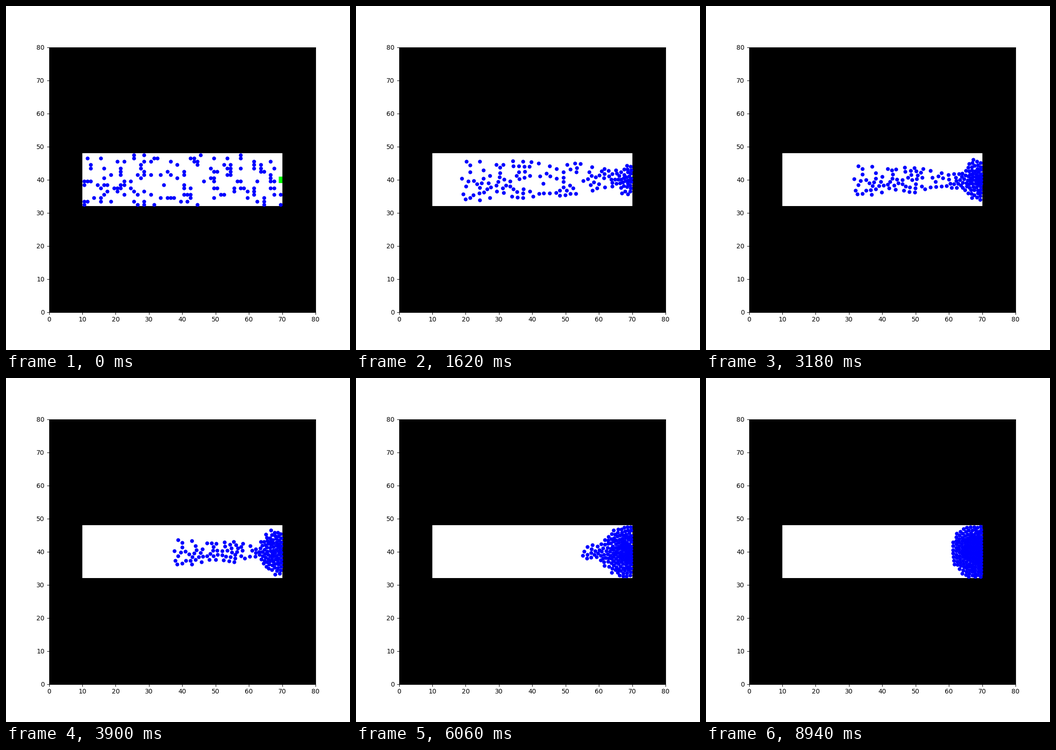
These frames come from a looping animation (748 by 748 pixels, 9000 ms). A matplotlib script:

```python
import numpy as np
import matplotlib.pyplot as plt
from matplotlib.animation import FuncAnimation
from matplotlib.patches import Rectangle

FRAMES, INTERVAL = 150, 60
SUBSTEPS = 5

LEFT, RIGHT, BOTTOM, TOP = 10, 70, 32, 48
EXIT = np.array([70.0, 40.0])

SPEED = 0.5      # desired speed, cells per frame
RELAX = 10.0     # frames needed to reach it
PUSH = 0.072     # repulsion at contact
RANGE = 0.08     # how fast repulsion fades
RADIUS = 0.5

# Occupied columns of each room row, from the bottom row up
ROWS = [
    [10, 26, 28, 31, 44, 64, 69],
    [10, 11, 15, 18, 25, 28, 39, 41, 62, 64],
    [13, 15, 33, 35, 36, 37, 42, 49, 59, 64],
    [16, 22, 26, 30, 40, 41, 42, 51, 52, 61, 67, 69],
    [17, 20, 25, 28, 55, 59, 61],
    [15, 19, 20, 21, 24, 40, 42, 49, 50, 55, 57, 58, 61, 66, 67],
    [10, 14, 16, 17, 21, 22, 34, 40],
    [10, 11, 12, 22, 24, 46, 49, 56, 57, 62, 66, 67],
    [16, 27, 38, 48, 49, 66],
    [18, 21, 26, 28, 30, 33, 36, 40, 53, 54, 66],
    [21, 28, 35, 40, 49, 50, 54, 63, 64],
    [12, 16, 21, 27, 48, 53, 54, 57, 61, 63, 67],
    [12, 27, 38, 44, 52, 54, 61, 63],
    [20, 22, 28, 30, 36, 43, 44, 61, 66],
    [11, 15, 25, 31, 32, 42, 43, 49, 53, 57],
    [25, 28, 45, 57],
]


def repulsion(gap):
    return PUSH * np.exp(np.minimum(-gap / RANGE, 4.5))


def acceleration(pos, vel):
    to_exit = EXIT - pos
    dist = np.linalg.norm(to_exit, axis=1, keepdims=True)
    acc = (SPEED * to_exit / np.maximum(dist, 0.05) - vel) / RELAX

    delta = pos[:, None] - pos[None]
    sep = np.sqrt((delta ** 2).sum(axis=2))
    np.fill_diagonal(sep, 1e3)
    sep = np.maximum(sep, 1e-6)
    force = repulsion(sep - 2 * RADIUS) / sep
    acc += (force[:, :, None] * delta).sum(axis=1)

    for axis, low, high in ((0, LEFT, RIGHT), (1, BOTTOM, TOP)):
        p = pos[:, axis]
        acc[:, axis] += repulsion(p - low - RADIUS) - repulsion(high - p - RADIUS)
    return acc


def simulate():
    pos = np.array([(col + 0.5, BOTTOM + row + 0.5)
                    for row, cols in enumerate(ROWS) for col in cols])
    vel = np.zeros_like(pos)
    dt = 1 / SUBSTEPS
    path = [pos.copy()]
    for frame in range(1, FRAMES):
        for _ in range(SUBSTEPS - (frame == 1)):
            vel += acceleration(pos, vel) * dt
            pos += vel * dt
            pos[:, 0] = np.clip(pos[:, 0], LEFT + 0.3, RIGHT - 0.3)
            pos[:, 1] = np.clip(pos[:, 1], BOTTOM + 0.3, TOP - 0.3)
        path.append(pos.copy())
    return path


path = simulate()

fig, ax = plt.subplots(figsize=(7.48, 7.48), dpi=100)
fig.subplots_adjust(left=0.125, right=0.9, bottom=0.11, top=0.88)
ax.set_facecolor("black")
ax.set(xlim=(0, 80), ylim=(0, 80),
       xticks=range(0, 81, 10), yticks=range(0, 81, 10))
ax.add_patch(Rectangle((LEFT, BOTTOM), RIGHT - LEFT, TOP - BOTTOM,
                       color="white", lw=0))
ax.add_patch(Rectangle((69, 39), 1, 2, color="lime", lw=0))
dots, = ax.plot([], [], "o", color="blue", ms=5)


def draw(frame):
    dots.set_data(path[frame].T)
    return dots,


anim = FuncAnimation(fig, draw, frames=FRAMES, interval=INTERVAL,
                     init_func=lambda: draw(0), repeat=True)
plt.show()
```
